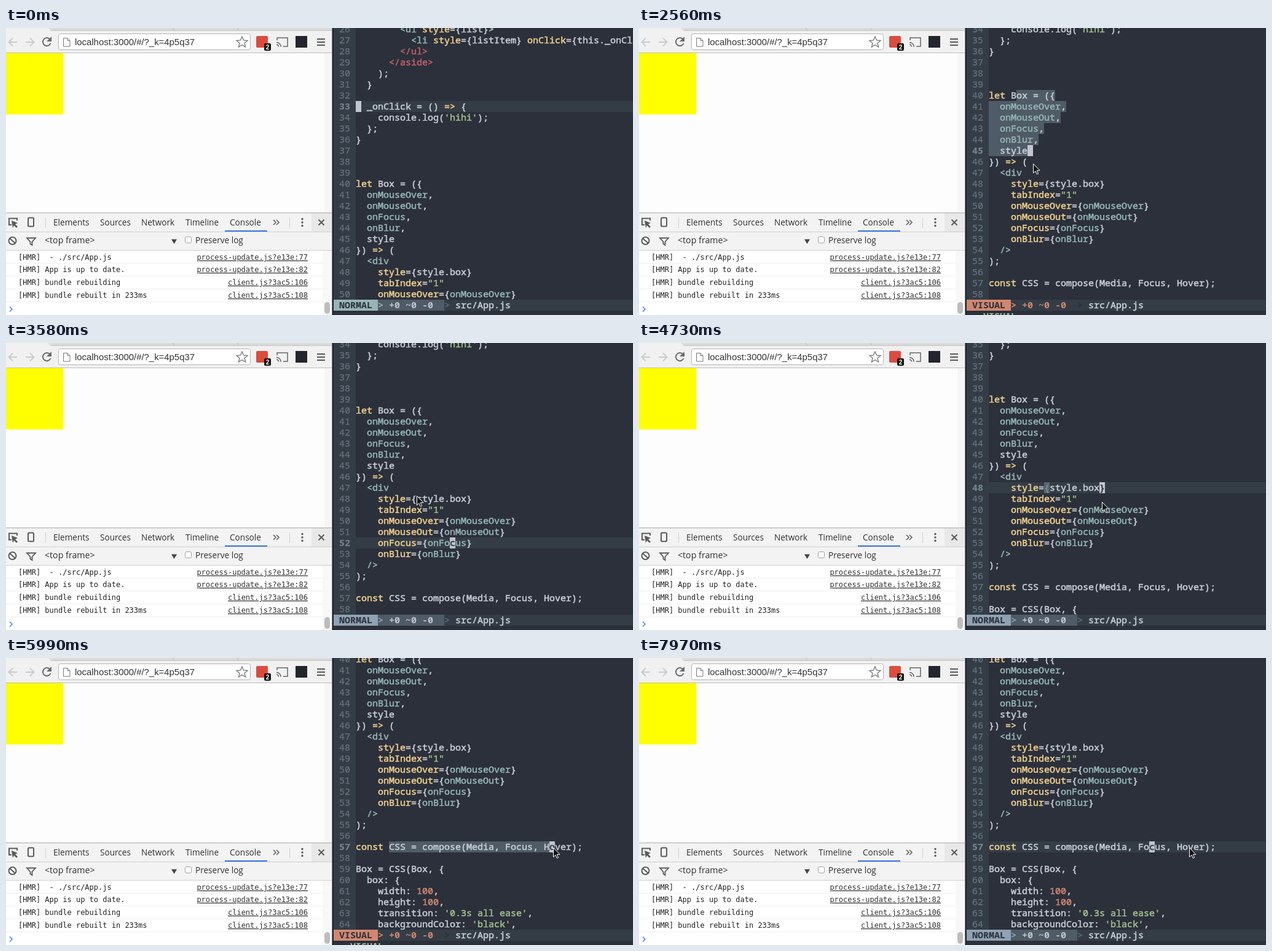
An HTML page that plays this animation: 1020x468 px, repeating every 8 s.

```html
<!DOCTYPE html>
<html lang="en">
<head>
<meta charset="utf-8">
<title>Hot reload session</title>
<style>
  html, body { margin: 0; width: 100%; height: 100%; overflow: hidden; background: #2b303b; }
  svg { display: block; }
  text { white-space: pre; }
  .code { font: 500 15px "Noto Sans Mono", monospace; color: #c8cdd5; }
  .code text { fill: currentColor; stroke: currentColor; stroke-width: .55px; }
  .code .bold { font-weight: 700; stroke: none; }
  .ui { font: 13.6px "Open Sans", sans-serif; fill: #303030; }
  .log { font: 12px "DejaVu Sans Mono", monospace; fill: #222; }
  .link { text-anchor: end; text-decoration: underline; fill: #333; }
  .key { color: #efcf8e; }
  .str { color: #a3be8c; }
  .num { color: #d08770; }
  .end { color: #bf616a; }
  .tag { color: #96b5b4; }
  .code .line { color: #65737e; stroke-width: .25px; }
  .code .line.on { font-weight: 700; color: #74828d; }
  .ico { fill: none; stroke: #5a5a5a; stroke-width: 2; }
</style>
</head>
<body>
<svg width="1020" height="468" viewBox="0 0 1020 468">
  <defs><clipPath id="view"><rect x="533" width="487" height="443"/></clipPath></defs>

  <!-- browser toolbar -->
  <rect width="530" height="468" fill="#fdfdfd"/>
  <rect width="530" height="40" fill="#f1f1f1"/>
  <path d="M72 0H530V4H75Z" fill="#dcdcdc"/>
  <path d="M70 0L73 4H530M271 0l3 4M376 0l3 4" fill="none" stroke="#b9b9b9"/>
  <path d="M0 40.5H530" stroke="#bdbdbd"/>
  <path class="ico" style="stroke:#cbcbcb" d="M18 23H5M11 16.500l-6.500 6.500 6.500 6.500M32 23H45M39 16.500l6.500 6.500-6.500 6.500"/>
  <path class="ico" style="stroke:#6a6a6a" d="M71.500 18.500A6.500 6.500 0 1 0 72.500 25"/>
  <path d="M74 14v8h-8z" fill="#6a6a6a"/>
  <rect x="85.500" y="9.500" width="312" height="26" rx="3" fill="#fff" stroke="#b4b4b4"/>
  <path d="M93.500 16.500h6.500l4 4v9.500h-10.500zM100 16.500v4h4" fill="#fff" stroke="#777"/>
  <text x="112" y="28" style="font:14.9px 'Liberation Sans',sans-serif;fill:#333">localhost:3000/#/?_k=4p5q37</text>
  <path d="M384 14l2.500 6 6.500.5-5 4.200 1.600 6.300-5.600-3.500-5.600 3.500 1.600-6.300-5-4.200 6.500-.5z" fill="#fff" stroke="#777" stroke-width="1.300"/>
  <rect x="407" y="13" width="19" height="19" rx="2" fill="#db4c3f"/>
  <rect x="420" y="25" width="11" height="12" rx="2" fill="#111"/>
  <text x="425.500" y="35" text-anchor="middle" style="font:700 10px 'Liberation Sans',sans-serif;fill:#fff">2</text>
  <path class="ico" style="stroke:#666;stroke-width:1.500" d="M441 20v-4h17v14h-7M440 23.500a7 7 0 0 1 7 7M440 27a3.500 3.500 0 0 1 3.500 3.500"/>
  <rect x="471" y="13" width="19" height="19" fill="#23252e"/>
  <path class="ico" d="M506 18h13M506 23h13M506 28h13"/>

  <!-- page -->
  <rect x="518" y="41" width="12" height="260" fill="#f6f6f6"/>
  <rect y="41" width="93" height="100" fill="#ff0"/>

  <!-- developer tools -->
  <rect y="301" width="530" height="62" fill="#f3f3f3"/>
  <rect x="497" y="302" width="33" height="30" fill="#e8e8e8"/>
  <path d="M0 301.500H530" stroke="#a8a8a8"/>
  <path d="M0 332.500H530M0 362.500H530M64.500 309v17M461.500 309v17" stroke="#cfcfcf"/>
  <path class="ico" d="M9 321H5V310.500H18V314"/>
  <path d="M9 314l10 4-4 2 4 4-2 2-4-4-2 4z" fill="#5a5a5a"/>
  <rect class="ico" x="36" y="309.500" width="9" height="14" rx="1.500"/>
  <path class="ico" style="stroke-width:1.500" d="M435 313l4 4-4 4M440 313l4 4-4 4"/>
  <path class="ico" d="M508.500 312.500l9 9M517.500 312.500l-9 9"/>
  <g fill="#5a5a5a"><circle cx="482" cy="311.500" r="1.700"/><circle cx="482" cy="317" r="1.700"/><circle cx="482" cy="322.500" r="1.700"/></g>
  <g class="ui">
    <text x="77" y="322">Elements</text>
    <text x="153" y="322">Sources</text>
    <text x="220" y="322">Network</text>
    <text x="292" y="322">Timeline</text>
    <text x="364" y="322">Console</text>
    <text x="63" y="351" style="font-size:14.2px">&lt;top frame&gt;</text>
    <text x="308" y="351">Preserve log</text>
  </g>
  <rect x="356" y="330" width="69" height="2" fill="#3b78e7"/>
  <g class="ico"><circle cx="10.500" cy="347" r="6"/><path d="M6 343l9 8"/></g>
  <path class="ico" style="stroke-width:1.800" d="M34 342.500H48L42.500 348.500V354L39.500 352V348.500z"/>
  <path d="M269 344.500h9l-4.500 7.500z" fill="#444"/>
  <rect x="291.500" y="340.500" width="10" height="10" rx="2" fill="#fff" stroke="#a0a0a0"/>
  <rect y="363" width="530" height="105" fill="#fff"/>
  <path d="M0 383.500H515M0 404.500H515M0 425.500H515M0 446.500H515" stroke="#f0f0f0"/>
  <rect x="515" y="363" width="15" height="105" fill="#f8f8f8"/>
  <rect x="518" y="447" width="9" height="19" rx="4.500" fill="#bdbdbd"/>
  <path d="M6 454.500l4 4-4 4" fill="none" stroke="#4a86e8" stroke-width="1.600"/>
  <g class="log" id="log"></g>

  <!-- editor -->
  <rect x="530" width="1" height="468" fill="#777b82"/>
  <rect x="531" width="2" height="468" fill="#20242c"/>
  <rect x="533" width="36" height="443" fill="#343d46"/>
  <g clip-path="url(#view)">
    <g id="doc" class="code">
      <rect id="row" x="569" width="451" height="18" fill="#343d46"/>
      <path id="sel" fill="#4f5b66"/>
      <g id="lines"></g>
      <rect id="pair" width="9" height="18" fill="#65737e"/>
      <rect id="block" width="9" height="18" fill="#c0c5ce"/>
      <text id="glyph" style="color:#2b303b"></text>
    </g>
  </g>
  <g class="code">
    <rect x="533" y="443" width="487" height="18" fill="#343d46"/>
    <rect id="modeBg" x="533" y="443" width="72" height="18"/>
    <rect id="gitBg" x="605" y="443" width="108" height="18"/>
    <text id="mode" class="bold" x="542" y="457" style="color:#2b303b"></text>
    <text id="arrow" x="605" y="457">&gt;</text>
    <text id="git" class="bold" x="623" y="457">+0 ~0 -0</text>
    <text id="arrow2" x="713" y="457">&gt;</text>
    <text x="731" y="457">src/App.js</text>
    <text id="msg" class="bold str" x="533" y="475">-- VISUAL --</text>
  </g>
  <path id="pointer" d="M.5 .5V15.500L4 12.300 6.300 17.500 8.600 16.500 6.300 11.300H11z" fill="#111" stroke="#fff"/>
</svg>

<script>
const $ = id => document.getElementById(id);
const FIRST = 26, COL = 9, ROW = 18, LEFT = 569, LAG = 30, LOOP = 8000;

const code = `        <ul style={list}>
          <li style={listItem} onClick={this._onClick} />
        </ul>
      </aside>
    );
  }

  _onClick = () => {
    console.log('hihi');
  };
}



let Box = ({
  onMouseOver,
  onMouseOut,
  onFocus,
  onBlur,
  style
}) => (
  <div
    style={style.box}
    tabIndex="1"
    onMouseOver={onMouseOver}
    onMouseOut={onMouseOut}
    onFocus={onFocus}
    onBlur={onBlur}
  />
);

const CSS = compose(Media, Focus, Hover);

Box = CSS(Box, {
  box: {
    width: 100,
    height: 100,
    transition: '0.3s all ease',
    backgroundColor: 'black',`.split('\n');

const logs = [
  ['[HMR]  - ./src/App.js', 'process-update.js?e13e:77'],
  ['[HMR] App is up to date.', 'process-update.js?e13e:82'],
  ['[HMR] bundle rebuilding', 'client.js?3ac5:106'],
  ['[HMR] bundle rebuilt in 233ms', 'client.js?3ac5:108']
];

// [time, first visible line]
const scroll = [[0, 26], [570, 30], [930, 32], [1020, 33], [1410, 34], [4730, 35],
  [4820, 36], [4880, 37], [4940, 38], [5030, 39], [5150, 40]];

// [time, x, y] of the pointer tip
const path = [[1640, 971, 267], [1800, 800, 170], [2010, 600, 88], [2170, 616, 107],
  [2320, 616, 107], [2560, 641, 221], [3030, 727, 326], [3210, 727, 326],
  [3580, 668, 249], [3660, 670, 254], [4010, 741, 256], [4040, 752, 258],
  [4540, 752, 258], [4550, 753, 259], [5150, 753, 259], [5450, 650, 292],
  [5570, 650, 292], [5700, 626, 308], [5940, 886, 309], [5990, 890, 309],
  [6100, 927, 311], [6290, 834, 310], [6710, 834, 310], [6860, 757, 309],
  [7110, 928, 305], [7290, 927, 305], [7570, 758, 308], [7970, 895, 309]];

// [press, end of drag, selection cleared]
const drags = [[2320, 3030, 3210], [3660, 4040, 4370], [5700, 6290, 6560]];

const syntax = /(?<str>'[^']*'|"[^"]*")|(?<num>\b\d+\b)|(?<end><\/\w+>)|(?<key>=>|\b(?:let|const)\b|\b\w+(?==[{"]))|(?<tag><\w+|\/>|\bon[A-Z]\w+)/g;
const esc = s => s.replace(/&/g, '&amp;').replace(/</g, '&lt;');
const rowTop = line => (line - FIRST) * ROW - 7;
const colX = col => LEFT + col * COL;
const textOf = line => code[line - FIRST] || '';

function set(id, attrs) {
  for (const name in attrs) $(id).setAttribute(name, attrs[name]);
}

function markup(text, y) {
  const span = (col, s, kind) =>
    s.trim() ? `<text x="${colX(col)}" y="${y}" class="${kind}">${esc(s)}</text>` : '';
  let out = '', at = 0;
  for (const m of text.matchAll(syntax)) {
    const kind = Object.keys(m.groups).find(k => m.groups[k]);
    out += span(at, text.slice(at, m.index), '') + span(m.index, m[0], kind);
    at = m.index + m[0].length;
  }
  return out + span(at, text.slice(at), '');
}

$('lines').innerHTML = code.map((text, i) => {
  const y = rowTop(FIRST + i) + 14;
  return `<text class="line" x="542" y="${y}">${FIRST + i}</text>` + markup(text, y);
}).join('');
const numbers = document.querySelectorAll('.line');

$('log').innerHTML = logs.map(([msg, link], i) => {
  const y = Math.round(377.5 + i * 20.8);
  return `<text x="20" y="${y}">${msg}</text><text class="link" x="491" y="${y}">${link}</text>`;
}).join('');

const lastBefore = (list, t) => list.filter(k => k[0] <= t).pop();
const topLine = t => lastBefore(scroll, t)[1];

function pointerAt(t) {
  const i = path.findIndex(k => k[0] > t);
  if (i < 0) return path[path.length - 1].slice(1);
  const [t0, x0, y0] = path[Math.max(i - 1, 0)], [t1, x1, y1] = path[i];
  const p = i ? (t - t0) / (t1 - t0) : 0;
  return [x0 + (x1 - x0) * p, y0 + (y1 - y0) * p];
}

function cellAt(t) {
  const [x, y] = pointerAt(t);
  const line = topLine(t) + Math.floor((y + 7) / ROW);
  return { line, col: Math.min(Math.floor((x - LEFT) / COL), textOf(line).length) };
}

function selection(a, b) {
  if (a.line > b.line || (a.line === b.line && a.col > b.col)) [a, b] = [b, a];
  let d = '';
  for (let n = a.line; n <= b.line; n++) {
    const from = n === a.line ? a.col : 0;
    const to = n === b.line ? b.col + 1 : textOf(n).length;
    d += `M${colX(from)} ${rowTop(n)}H${colX(to)}v${ROW}H${colX(from)}z`;
  }
  return d;
}

function draw(t) {
  const top = topLine(t), drag = lastBefore(drags, t);
  const visual = !!drag && t < drag[2];
  const cur = drag
    ? cellAt(Math.min(Math.max(t - LAG, drag[0]), drag[1]))
    : { line: Math.max(33, top + 3), col: 0 };
  const x = colX(cur.col), y = rowTop(cur.line);
  const text = textOf(cur.line), char = text[cur.col] || '';

  set('doc', { transform: `translate(0 ${(FIRST - top) * ROW})` });
  set('row', { y, opacity: visual ? 0 : 1 });
  set('sel', { d: visual ? selection(cellAt(drag[0]), cur) : '' });
  set('pair', { x: colX(text.lastIndexOf('{', cur.col)), y, opacity: char === '}' ? 0.75 : 0 });
  set('block', { x, y });
  set('glyph', { x, y: y + 14 });
  $('glyph').textContent = char;
  numbers.forEach((n, i) => n.classList.toggle('on', FIRST + i === cur.line));

  const tone = visual ? '#d08770' : drag ? '#8fa1b3' : '#96b5b4';
  $('mode').textContent = visual ? 'VISUAL' : 'NORMAL';
  set('modeBg', { fill: tone });
  set('gitBg', { fill: visual ? '#343d46' : '#4f5b66' });
  $('arrow').style.color = tone;
  $('git').style.color = visual ? tone : '#c0c5ce';
  $('arrow2').style.color = visual ? '#2b303b' : '#5a6772';
  set('msg', { opacity: visual ? 1 : 0 });

  const [px, py] = pointerAt(t).map(Math.round);
  set('pointer', { transform: `translate(${px} ${py})`, opacity: t < path[0][0] ? 0 : 1 });
}

const start = performance.now();
function tick() {
  draw((performance.now() - start) % LOOP);
  requestAnimationFrame(tick);
}
tick();
</script>
</body>
</html>
```
